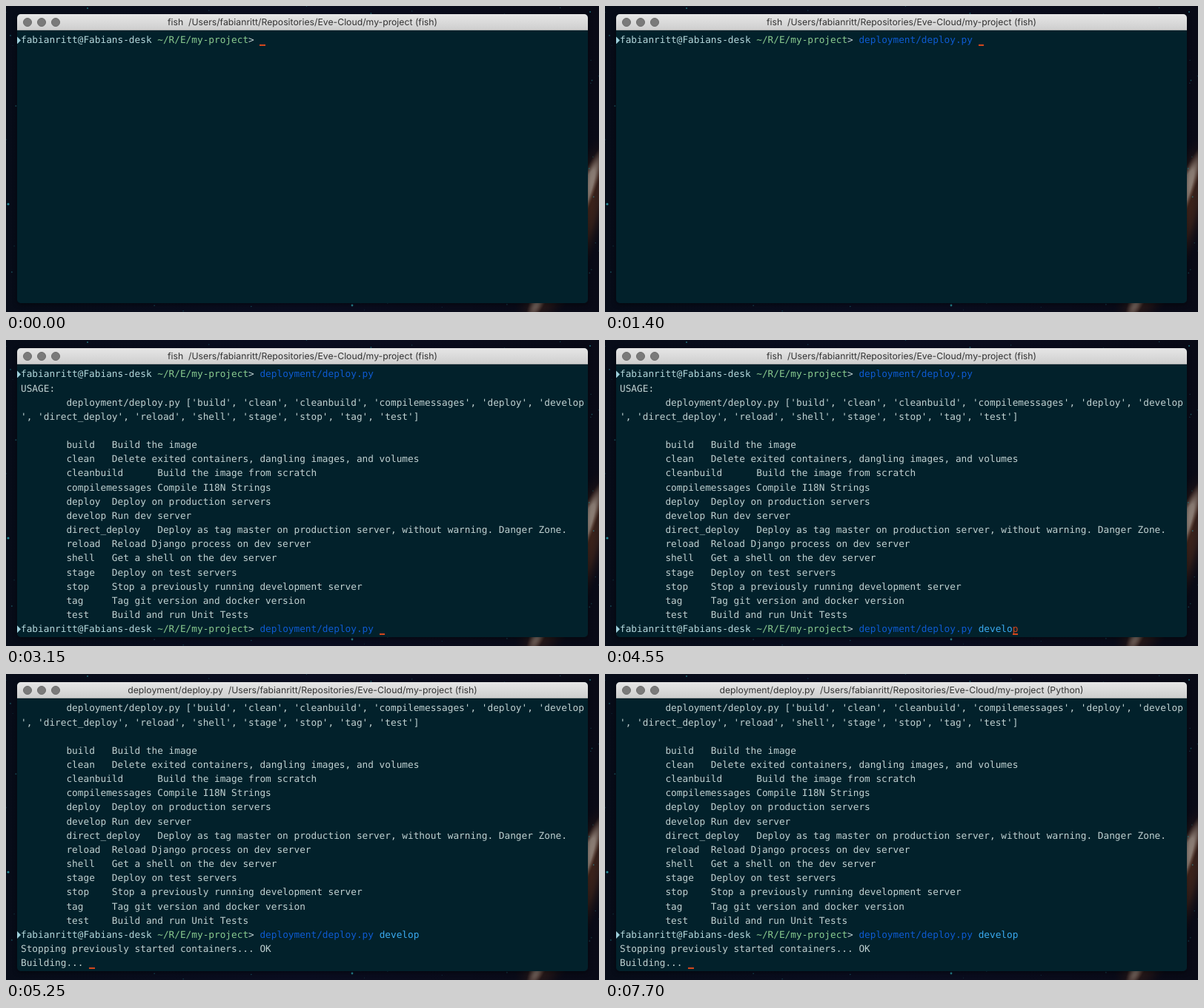
Recreate the animation shown at these times as an HTML page. Size 800 px wide and 414 px high, loop 8 s.

```html
<!DOCTYPE html>
<html lang="en">
<head>
<meta charset="utf-8">
<title>Terminal session</title>
<style>
  html, body { margin: 0; width: 100%; height: 100%; overflow: hidden; background: #080b19; }
  #stage { position: relative; width: 800px; height: 414px; overflow: hidden; }
  #sky { position: absolute; inset: 0; }
  .window, .shadow {
    position: absolute; left: 15px; top: 11px; width: 770px; height: 391px; border-radius: 5px;
  }
  .window { overflow: hidden; background: #02212b; }
  .shadow { box-shadow: 0 2px 6px rgba(0, 0, 0, .45); }
  .bar {
    position: relative; height: 22px; background: linear-gradient(#e6e6e6, #cecece);
    box-shadow: inset 0 -1px #a9a9a9;
  }
  .bar i {
    position: absolute; top: 4.5px; width: 12px; height: 12px; box-sizing: border-box;
    border: 1px solid #6c6c6c; border-radius: 50%; background: #7a7a7a;
  }
  #title {
    text-align: center; color: #333; white-space: pre; text-rendering: geometricPrecision;
    font: 12.24px/22px Inter, "Open Sans", sans-serif;
  }
  #screen {
    position: absolute; left: 5px; top: 26.4px; color: #c0d1d1;
    font: 12.755px/19.17px "DejaVu Sans Mono", "Noto Sans Mono", monospace;
    white-space: pre; tab-size: 8; text-rendering: geometricPrecision;
    font-variant-ligatures: none;
  }
  #screen div { position: relative; height: 19.17px; }
  .prompt::before {
    content: ""; position: absolute; left: -5px; top: 4px; width: 5px; height: 10px;
    background: #9fd0dc; clip-path: polygon(0 0, 100% 50%, 0 100%);
  }
  .user { color: #b5d8dc; }
  .path { color: #8acb90; }
  .cmd { color: #0e5bd2; }
  .arg { color: #3aaaf0; }
  .hint { color: #586e75; }
  .cursor { color: #d5471c; box-shadow: inset 0 -2px #d5471c; }
</style>
</head>
<body>
<div id="stage">
  <svg id="sky" width="800" height="414">
    <defs>
      <linearGradient id="night" x2="1" y2="0">
        <stop stop-color="#070c18"/>
        <stop offset=".5" stop-color="#0a0d20"/>
        <stop offset="1" stop-color="#090a16"/>
      </linearGradient>
      <radialGradient id="halo">
        <stop stop-color="#6b3a22"/>
        <stop offset=".6" stop-color="#4a2a1c" stop-opacity=".6"/>
        <stop offset="1" stop-color="#1a0e10" stop-opacity="0"/>
      </radialGradient>
      <radialGradient id="core">
        <stop stop-color="#c9c0b6"/>
        <stop offset=".7" stop-color="#a3968c" stop-opacity=".75"/>
        <stop offset="1" stop-color="#6a4634" stop-opacity="0"/>
      </radialGradient>
    </defs>
    <rect width="800" height="414" fill="url(#night)"/>
    <g transform="translate(755 311) rotate(23.3)">
      <ellipse rx="42" ry="155" cx="3" fill="url(#halo)"/>
      <ellipse rx="15" ry="138" fill="url(#core)"/>
    </g>
    <g id="stars"></g>
  </svg>
  <div class="shadow"></div>
  <div class="window">
    <div class="bar">
      <i style="left:8px"></i>
      <i style="left:27px"></i>
      <i style="left:46px"></i>
      <div id="title"></div>
    </div>
    <div id="screen"></div>
  </div>
</div>
<script>
const LOOP = 8000, ROWS = 19;
const user = "fabianritt", script = "deployment/deploy.py";
const $ = id => document.getElementById(id);
const span = (cls, text) => `<span class="${cls}">${text}</span>`;
const row = (html, cls = "") => `<div class="${cls}">${html}</div>`;
const cursor = (char = " ") => span("cursor", char);

const prompt = rest => row(
  span("user", user + "@Fabians-desk ") + span("path", "~/R/E/my-project") + "&gt; " + rest, "prompt");
const command = (typed, arg = "") => span("cmd", typed) + (arg && " " + span("arg", arg));

// Typed argument followed by the rest of the suggested word
const suggest = typed => {
  const rest = "develop".slice(typed.length);
  return command(script, typed) + cursor(rest[0]) + span("hint", rest.slice(1));
};

const usage = `USAGE:
\t${script} ['build', 'clean', 'cleanbuild', 'compilemessages', 'deploy', 'develop
', 'direct_deploy', 'reload', 'shell', 'stage', 'stop', 'tag', 'test']

\tbuild\tBuild the image
\tclean\tDelete exited containers, dangling images, and volumes
\tcleanbuild\tBuild the image from scratch
\tcompilemessages\tCompile I18N Strings
\tdeploy\tDeploy on production servers
\tdevelop\tRun dev server
\tdirect_deploy\tDeploy as tag master on production server, without warning. Danger Zone.
\treload\tReload Django process on dev server
\tshell\tGet a shell on the dev server
\tstage\tDeploy on test servers
\tstop\tStop a previously running development server
\ttag\tTag git version and docker version
\ttest\tBuild and run Unit Tests`.split("\n").map(line => row(line));

const first = prompt(command(script));
const help = [first, ...usage];
const typing = text => [prompt(command(text) + cursor())];
const again = rest => [...help, prompt(rest)];
const started = again(command(script, "develop"));
const building = [...started, row("Stopping previously started containers... OK"), row("Building... " + cursor())];

// [start time, screen rows, running job, process name]
const steps = [
  [0, typing("")],
  [350, typing("de")],
  [700, typing("deploy")],
  [1050, typing("deployment/")],
  [1400, typing(script + " ")],
  [1750, [first, row(cursor())]],
  [2100, again(cursor())],
  [2800, again(command(script) + cursor())],
  [3150, again(command(script + " ") + cursor())],
  [3850, again(suggest("d"))],
  [4200, again(suggest("dev"))],
  [4550, again(suggest("develo"))],
  [4900, [...started, row(cursor())], script],
  [5250, building, script],
  [5600, building, script, "Python"]
];

function drawStars() {
  let seed = 11;
  const rnd = () => (seed = seed * 16807 % 2147483647) / 2147483647;
  const star = (x, y, r, o) =>
    `<circle cx="${x}" cy="${y}" r="${r}" fill="#2b97a3" opacity="${o}"/>`;
  let out = star(3, 268, 1.6, .9) + star(467, 405, 1.4, .9) + star(110, 3, 1, .7) + star(788, 8, 1, .7);
  for (let i = 0; i < 300; i++)
    out += star(rnd() * 800, rnd() * 414, .4 + rnd() * .6, .2 + rnd() * .4);
  $("stars").innerHTML = out;
}

let shown;
function tick() {
  const t = performance.now() % LOOP;
  const step = steps.findLast(s => s[0] <= t);
  if (step !== shown) {
    shown = step;
    const [, rows, job = "fish", process = "fish"] = step;
    $("screen").innerHTML = rows.slice(-ROWS).join("");
    $("title").textContent = `${job}  /Users/${user}/Repositories/Eve-Cloud/my-project (${process})`;
  }
  requestAnimationFrame(tick);
}

drawStars();
tick();
</script>
</body>
</html>
```
